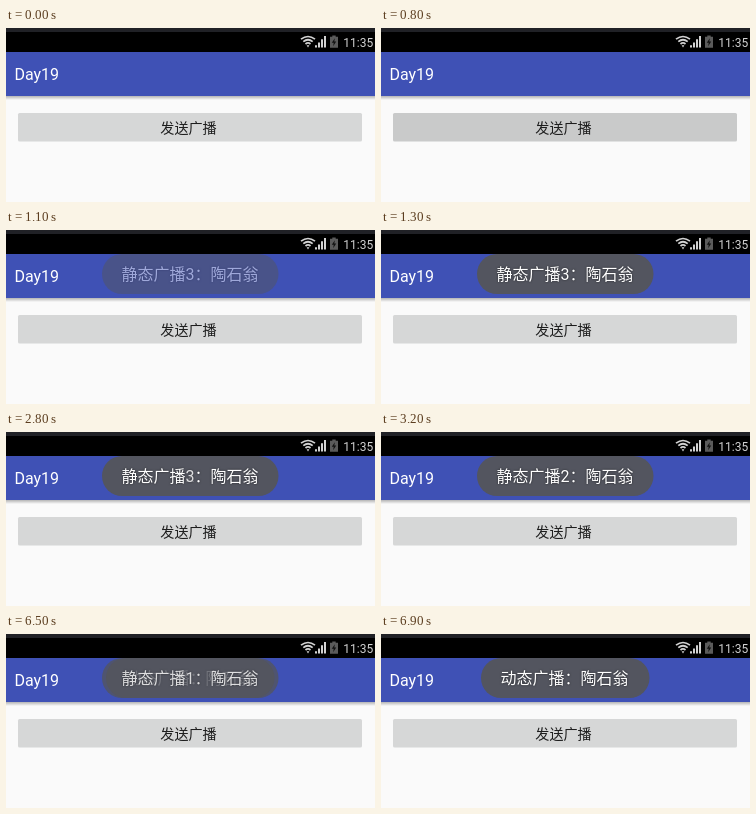
An HTML page that plays this animation: 369x174 px, repeating every 8000 ms.

```html
<!DOCTYPE html>
<html lang="zh-CN">
<head>
<meta charset="utf-8">
<title>Broadcast toasts</title>
<style>
  html, body { margin: 0; width: 100%; height: 100%; overflow: hidden; background: #fafafa; }
  svg { display: block; width: 369px; height: 174px; }
  text { font-family: Roboto, "Noto Sans CJK SC", "Noto Sans CJK", sans-serif; }
  #toast text { font-size: 16px; fill: #fff; }
  #labels { filter: drop-shadow(0 0 1px rgba(0, 0, 0, .55)); }
</style>
</head>
<body>
<svg viewBox="0 0 369 174">
  <defs>
    <linearGradient id="shade" x2="0" y2="1">
      <stop stop-color="#000" stop-opacity=".28"/>
      <stop offset="1" stop-color="#000" stop-opacity="0"/>
    </linearGradient>
  </defs>
  <rect width="369" height="174" fill="#fafafa"/>

  <!-- status bar -->
  <rect width="369" height="24" fill="#000"/>
  <rect width="369" height="4" fill="#202126"/>
  <g fill="none" stroke="#d2d2d2" stroke-width="1.7">
    <path d="M295 11.2Q302 5.8 309 11.2"/>
    <path d="M297.3 13.7Q302 9.8 306.7 13.7"/>
    <path d="M299.5 16Q302 13.8 304.5 16"/>
  </g>
  <path d="M300.6 17.2h2.8L302 19.4z" fill="#d2d2d2"/>
  <path d="M309 19.5v-2.2h2v2.2zM312 19.5v-5h2v5zM315 19.5v-8.2h2v8.2zM318 19.5v-11.5h2v11.5z" fill="#d2d2d2"/>
  <path d="M326.3 7.5h3.4v1.3h2.3v10.9h-8v-10.9h2.3z" fill="#5b5b5b"/>
  <path d="M328.8 10.3l-3 4.5h1.9l-.5 3.4 3-4.7h-1.9z" fill="#111"/>
  <text x="337.3" y="18.5" font-size="12" fill="#d2d2d2">11:35</text>

  <!-- app bar -->
  <rect y="24" width="369" height="44" fill="#3f51b5"/>
  <rect y="68" width="369" height="4" fill="url(#shade)"/>
  <text x="8.4" y="52" font-size="16" fill="#fff">Day19</text>

  <!-- button -->
  <rect x="12" y="85" width="344" height="28.5" rx="1.5" fill="#d6d7d7"/>
  <rect id="press" x="12" y="85" width="344" height="28.5" rx="1.5" opacity="0"/>
  <text x="182.5" y="104.8" font-size="14.1" text-anchor="middle" fill="#1d1d1d">发送广播</text>

  <g id="toast" opacity="0">
    <rect id="wide" x="96" y="24" width="176.5" height="40" rx="20" fill="#53555f"/>
    <rect id="narrow" x="100" y="24" width="168.5" height="40" rx="20" fill="#53555f"/>
    <g id="labels">
      <g id="static">
        <text x="115.4" y="50">静态广播</text>
        <text class="digit" x="179.6" y="50">3</text>
        <text class="digit" x="179.6" y="50">2</text>
        <text class="digit" x="179.6" y="50">1</text>
        <text x="188.4" y="50">：陶石翁</text>
      </g>
      <text id="dynamic" x="119.4" y="50">动态广播：陶石翁</text>
    </g>
  </g>
</svg>
<script>
  const LOOP = 8000, STEP = 100;
  const $ = id => document.getElementById(id);
  const digits = document.querySelectorAll('.digit');
  const ramp = (t, from, to) => Math.min(1, Math.max(0, (t - from) / (to - from)));
  const fade = (el, value) => el.setAttribute('opacity', value);

  function draw(time) {
    // the screen refreshes ten times a second
    const t = Math.floor(time % LOOP / STEP) * STEP;
    const toTwo = ramp(t, 2700, 3200);
    const toOne = ramp(t, 4600, 5000);
    const toDynamic = ramp(t, 6400, 6900);

    fade($('press'), t >= 800 ? .06 * (1 - ramp(t, 800, 920)) : 0);
    fade($('toast'), ramp(t, 950, 1250));
    fade(digits[0], 1 - toTwo);
    fade(digits[1], toTwo * (1 - toOne));
    fade(digits[2], toOne);
    fade($('wide'), 1 - toDynamic);
    fade($('narrow'), toDynamic > 0 ? 1 : 0);
    fade($('static'), 1 - toDynamic);
    fade($('dynamic'), toDynamic);
  }

  const start = performance.now();
  function tick() {
    draw(performance.now() - start);
    requestAnimationFrame(tick);
  }
  tick();
</script>
</body>
</html>
```
